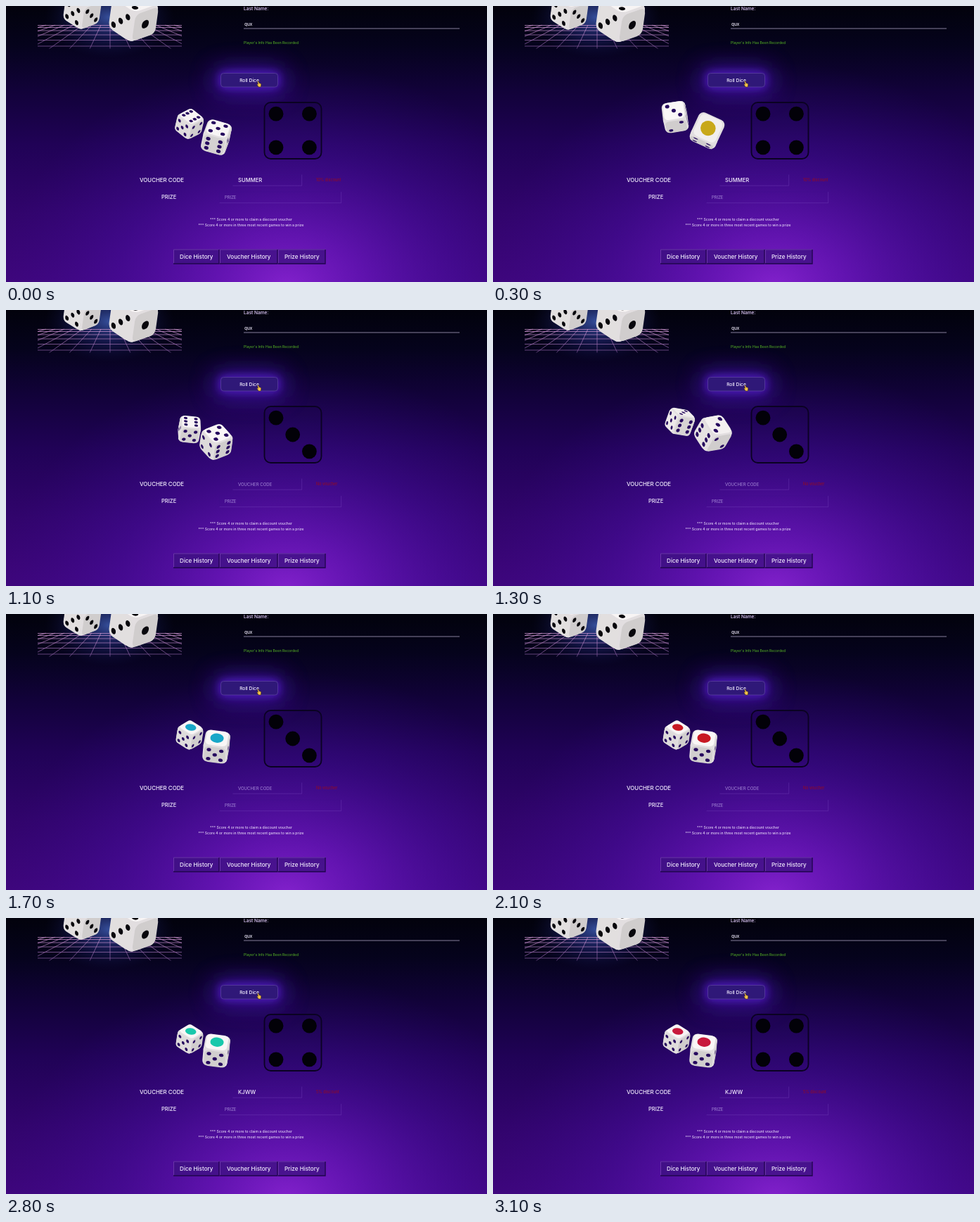
Recreate the animation shown at these times as an HTML page with a canvas. Size 684 by 392 pixels, loop 3.2 s.

```html
<!DOCTYPE html>
<html lang="en">
<head>
<meta charset="utf-8">
<title>Dice game</title>
<style>
  html, body { margin: 0; width: 100%; height: 100%; overflow: hidden; background: #02020c; }
  svg, canvas { position: absolute; left: 0; top: 0; width: 684px; height: 392px; }
  text { font-family: Inter, "Open Sans", sans-serif; font-weight: 500; fill: #f4efff; }
  .mid { text-anchor: middle; }
  .hint { font-size: 5.1px; fill: #e2d4f5; }
  .holder { font-weight: 400; fill: #a78bd8; }
</style>
</head>
<body>
<svg viewBox="0 0 684 392">
  <defs>
    <linearGradient id="night" x2="0" y2="1">
      <stop offset="0" stop-color="#02020c"/>
      <stop offset=".14" stop-color="#05031c"/>
      <stop offset=".3" stop-color="#110238"/>
      <stop offset=".5" stop-color="#200256"/>
      <stop offset=".75" stop-color="#31046c"/>
      <stop offset="1" stop-color="#3e067c"/>
    </linearGradient>
    <radialGradient id="floorGlow" gradientUnits="userSpaceOnUse" cx="0" cy="0" r="1" gradientTransform="translate(400 400) scale(410 320)">
      <stop offset="0" stop-color="#9428e0" stop-opacity=".8"/>
      <stop offset=".25" stop-color="#7a1cd4" stop-opacity=".6"/>
      <stop offset=".6" stop-color="#5212b8" stop-opacity=".32"/>
      <stop offset="1" stop-color="#3a0a98" stop-opacity="0"/>
    </radialGradient>
    <radialGradient id="heroGlow">
      <stop offset="0" stop-color="#4668c8" stop-opacity=".75"/>
      <stop offset=".5" stop-color="#2a3490" stop-opacity=".4"/>
      <stop offset="1" stop-color="#141450" stop-opacity="0"/>
    </radialGradient>
    <linearGradient id="gridFade" gradientUnits="userSpaceOnUse" x1="0" y1="27" x2="0" y2="61">
      <stop offset="0" stop-color="#d59ad6"/>
      <stop offset="1" stop-color="#80559c"/>
    </linearGradient>
    <clipPath id="gridArea"><rect x="45" y="26.5" width="205" height="34"/></clipPath>
    <filter id="blur" x="-100%" y="-300%" width="300%" height="700%"><feGaussianBlur stdDeviation="6"/></filter>
    <filter id="wideBlur" x="-100%" y="-300%" width="300%" height="700%"><feGaussianBlur stdDeviation="17"/></filter>
  </defs>
  <rect width="684" height="392" fill="url(#night)"/>
  <rect width="684" height="392" fill="url(#floorGlow)"/>
  <ellipse cx="147" cy="16" rx="92" ry="58" fill="url(#heroGlow)"/>
  <path id="grid" fill="none" stroke="url(#gridFade)" stroke-width=".7" clip-path="url(#gridArea)"/>

  <text x="338" y="6" font-size="6.6" font-weight="600" style="fill:#e6d0ff">Last Name:</text>
  <text x="339" y="28.3" font-size="6.4">qux</text>
  <path d="M338 32H645" stroke="#a79fbd" stroke-width=".8"/>
  <text x="338" y="54" font-size="5" style="fill:#4fa324">Player's Info Has Been Recorded</text>

  <rect x="295" y="88" width="102" height="36" rx="12" fill="#5a1ae0" opacity=".6" filter="url(#wideBlur)"/>
  <rect x="303" y="93" width="86" height="24" rx="6" fill="#6420e8" opacity=".6" filter="url(#blur)"/>
  <rect x="305.5" y="95.5" width="81" height="19.5" rx="4" fill="#2f1878" stroke="#5a3f9e" stroke-width=".8"/>
  <text class="mid" x="346" y="107.5" font-size="6.7" font-weight="600">Roll Dice</text>
  <path d="M357.8 107.2q1-.9 1.5.4l.6 2 1.600.3q1.500.3 1.300 1.800l-.5 3.200h-3.100l-2.400-3.300q.2-1 1.500-.3z" fill="#f0c24a" stroke="#38200c" stroke-width=".5"/>

  <rect x="367.5" y="137" width="81" height="80" rx="9" fill="#10003a" fill-opacity=".08" stroke="#0a0222" stroke-width="1.8"/>
  <g id="score"></g>

  <text x="190" y="250" font-size="7.9">VOUCHER CODE</text>
  <text x="221" y="274.4" font-size="7.6">PRIZE</text>
  <g fill="none" stroke-width=".7">
    <path d="M322.5 255V239.5H421M303.5 280V264H477" stroke="#3c1488" stroke-opacity=".4"/>
    <path d="M322.5 255.2H420.7V239.5M303.5 279.7H476.7V264" stroke="#7a4bc0" stroke-opacity=".5"/>
  </g>
  <text id="code" x="330"></text>
  <text id="message" x="441" y="249" font-size="5.5" style="fill:#8c0c2c"></text>
  <text class="holder" x="311" y="274.2" font-size="5.9">PRIZE</text>

  <text class="mid hint" x="348.5" y="305.3">*** Score 4 or more to claim a discount voucher</text>
  <text class="mid hint" x="348.5" y="313">*** Score 4 or more in three most recent games to win a prize</text>
  <g id="tabs"></g>
</svg>
<canvas id="dice"></canvas>

<script>
const LOOP = 3200, STEP = 100, ROLL = 1150, TAU = Math.PI * 2;
const $ = id => document.getElementById(id);
const canvas = $('dice'), ctx = canvas.getContext('2d');
const dpr = Math.max(1, window.devicePixelRatio || 1);
canvas.width = 684 * dpr;
canvas.height = 392 * dpr;

// Perspective floor
let floor = '';
for (const y of [27.5, 30.5, 35, 41, 48.5, 57]) floor += `M45 ${y}H250`;
for (let i = -9; i <= 9; i++) floor += `M${148 + i * 13} 27L${148 + i * 29} 61`;
$('grid').setAttribute('d', floor);

// Bevelled history buttons
$('tabs').innerHTML = [['Dice History', 238, 303.5], ['Voucher History', 304, 386.5], ['Prize History', 387, 454.5]]
  .map(([label, l, r]) => `
    <rect x="${l}" y="345.5" width="${r - l}" height="21" fill="#3c1080" fill-opacity=".75"/>
    <path d="M${l + .5} 366V346H${r}" fill="none" stroke="#6a34a8"/>
    <path d="M${l} 366H${r - .5}V346" fill="none" stroke="#220650" stroke-width="1.3"/>
    <text class="mid" x="${(l + r) / 2}" y="358.8" font-size="8.1">${label}</text>`).join('');

// Pip positions on a -1..1 grid; 0 stands for the face with the round mark
function pipSpots(n) {
  const spots = n % 2 ? [[0, 0]] : [];
  if (n > 1) spots.push([-1, -1], [1, 1]);
  if (n > 3) spots.push([1, -1], [-1, 1]);
  if (n === 6) spots.push([-1, 0], [1, 0]);
  return spots;
}

const results = [
  { from: 0, score: 4, code: 'SUMMER', message: '10% discount' },
  { from: 500, score: 1, code: '', message: 'No voucher' },
  { from: 1100, score: 3, code: '', message: 'No voucher' },
  { from: 2300, score: 4, code: 'KJWW', message: '5% discount' }
];
let shown;
function showResult(t) {
  const now = results.filter(r => r.from <= t).pop();
  if (now === shown) return;
  shown = now;
  $('score').innerHTML = pipSpots(now.score)
    .map(([x, y]) => `<circle cx="${407.7 + x * 23.7}" cy="${177 + y * 23.8}" r="10.4" fill="#020108"/>`).join('');
  const code = $('code');
  code.textContent = now.code || 'VOUCHER CODE';
  code.setAttribute('class', now.code ? '' : 'holder');
  code.setAttribute('font-size', now.code ? 7.7 : 6.05);
  code.setAttribute('y', now.code ? 250 : 249.8);
  $('message').textContent = now.message;
}

// Yaw shows the right side, pitch shows the top, roll turns on screen
function rotator(yaw, pitch, roll) {
  const [a, p, c] = [yaw, pitch, roll].map(d => d * TAU / 360);
  return ([x, y, z]) => {
    const x1 = x * Math.cos(a) - z * Math.sin(a), z1 = x * Math.sin(a) + z * Math.cos(a);
    const y1 = -(y * Math.cos(p) - z1 * Math.sin(p));
    return [
      x1 * Math.cos(c) - y1 * Math.sin(c),
      x1 * Math.sin(c) + y1 * Math.cos(c),
      y * Math.sin(p) + z1 * Math.cos(p)
    ];
  };
}

function drawDie({ x, y, size, yaw, pitch, roll, faces, mark, ink }) {
  const turn = rotator(yaw, pitch, roll);
  const round = .19, core = .5 - round;
  const [top, front, right] = faces;
  const values = [right, top, front];
  const visible = [];
  for (let axis = 0; axis < 3; axis++) for (const sign of [1, -1]) {
    const unit = k => [0, 1, 2].map(i => +(i === k));
    const n = turn(unit(axis).map(v => v * sign));
    if (n[2] < .01) continue;
    const u = turn(unit(axis === 0 ? 2 : 0)), v = turn(unit(axis === 1 ? 2 : 1));
    const light = Math.max(0, -.25 * n[0] - .7 * n[1] + .65 * n[2]);
    const level = Math.round(208 + 44 * Math.min(1, light));
    const value = sign > 0 ? values[axis] : 7 - (values[axis] || 1);
    visible.push({ n, u, v, value, color: `rgb(${level},${level - 3},${level - 3})` });
  }
  const onFace = ({ n, u, v }, depth, draw) => {
    ctx.save();
    ctx.translate(x, y);
    ctx.scale(size, size);
    ctx.transform(u[0], u[1], v[0], v[1], n[0] * depth, n[1] * depth);
    draw();
    ctx.restore();
  };

  ctx.lineJoin = 'round';
  ctx.lineWidth = size * round * 2;
  ctx.fillStyle = ctx.strokeStyle = '#e2dee0';
  for (const face of visible) {
    ctx.beginPath();
    onFace(face, core, () => ctx.rect(-core, -core, core * 2, core * 2));
    ctx.fill();
    ctx.stroke();
  }
  for (const face of visible) onFace(face, .48, () => {
    ctx.fillStyle = face.color;
    ctx.beginPath();
    ctx.roundRect(-.43, -.43, .86, .86, .18);
    ctx.fill();
    ctx.fillStyle = face.value ? ink : mark;
    const spots = face.value ? pipSpots(face.value) : [[0, 0]];
    const radius = face.value === 0 ? .27 : face.value === 1 ? .13 : .09;
    for (const [px, py] of spots) {
      ctx.beginPath();
      ctx.arc(px * .25, py * .25, radius, 0, TAU);
      ctx.fill();
    }
  });
}

const pose = (x, y, size, yaw, pitch, roll, ...faces) => ({ x, y, size, yaw, pitch, roll, faces });
const rest = [pose(261, 172, 29, 36, 37, 9, 0, 5, 4), pose(299, 188.5, 35.5, 4, 44, 5, 0, 5, 3)];
const lift = [pose(260.7, 167.5, 30, 37, 39, 13, 6, 5, 4), pose(299, 186.5, 36, 6, 42, 12, 5, 6, 3)];

// One throw: lift off, tumble, land and lie still; hue of the mark drifts all the while
const tumble = [
  { at: 0, hue: 15, dice: lift },
  { at: 150, hue: 30, dice: [pose(266, 159, 31, 58, 17, 20, 3, 5, 6), pose(313, 175, 38, 38, 41, 30, 3, 6, 2)] },
  { at: 200, hue: 36, dice: [pose(265.5, 165.5, 30, 18, 38, -5, 4, 6, 2), pose(308.5, 190.5, 35, 36, 46, -30, 3, 2, 0)] },
  { at: 300, hue: 49, dice: [pose(259, 157.5, 34, 5, 56, -13, 3, 2, 6), pose(304.5, 177, 40, 3, 79, 22, 0, 4, 5)] },
  { at: 500, hue: 170, dice: rest },
  { at: 700, hue: 255, dice: rest },
  { at: 800, hue: 348, dice: rest },
  { at: 1050, hue: 362, dice: rest },
  { at: ROLL, hue: 375, dice: lift }
];

function drawTumble(t) {
  const phase = t % ROLL;
  const i = tumble.findIndex(k => k.at > phase) - 1;
  const a = tumble[i], b = tumble[i + 1];
  const mix = (from, to, u) => from + (to - from) * u;
  const u = (phase - a.at) / (b.at - a.at);
  const hue = mix(a.hue, b.hue, u);
  a.dice.forEach((from, k) => {
    const to = b.dice[k];
    const die = { faces: (u < .5 ? from : to).faces, mark: `hsl(${hue} 78% 44%)`, ink: '#26085e' };
    for (const key of ['x', 'y', 'size', 'yaw', 'pitch', 'roll']) die[key] = mix(from[key], to[key], u);
    // A quarter turn maps the cube onto itself, so the faces change over halfway
    if (from !== to) die.yaw += 90 * (u - Math.round(u));
    drawDie(die);
  });
}

function drawHero(t) {
  const bob = 3 * Math.cos(TAU * (t - 300) / 1950);
  const style = { mark: '#000', ink: '#08070c' };
  drawDie({ ...pose(108.5, 4 + bob * .8, 40, 42, 30, 8, 6, 5, 3), ...style });
  drawDie({ ...pose(181.5, 13 + bob, 52, 44, 30, 8, 5, 3, 1), ...style });
}

function frame(now) {
  const t = Math.floor(now % LOOP / STEP) * STEP;
  ctx.setTransform(dpr, 0, 0, dpr, 0, 0);
  ctx.clearRect(0, 0, 684, 392);
  drawHero(t);
  drawTumble(t);
  showResult(t);
  requestAnimationFrame(() => frame(performance.now() - start));
}
const start = performance.now();
frame(0);
</script>
</body>
</html>
```
